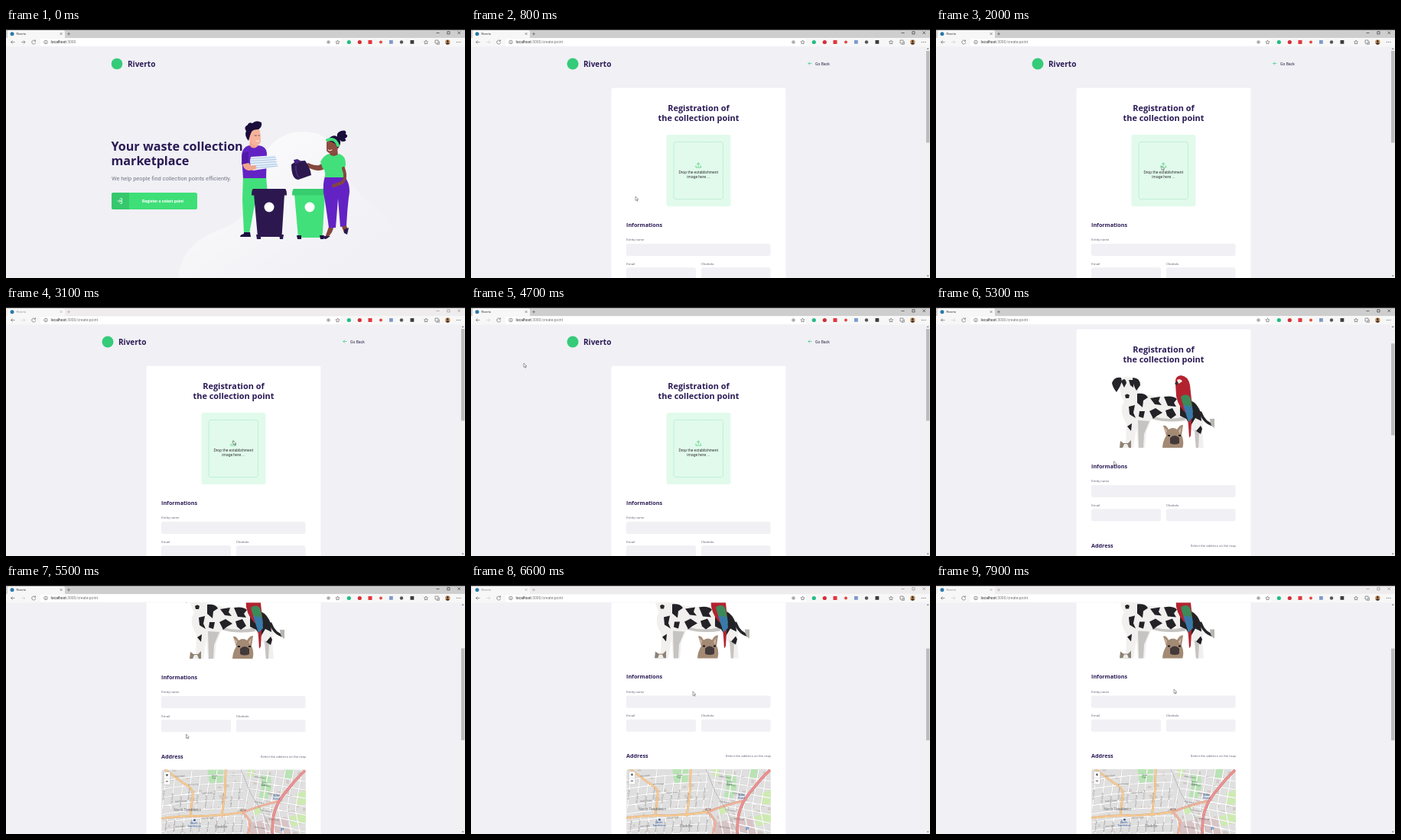
These frames come from a looping animation (600x328 px, 8000 ms). An HTML page:

```html
<!DOCTYPE html>
<html lang="en">
<head>
<meta charset="utf-8">
<title>Riverto</title>
<style>
  html, body { margin: 0; width: 100%; height: 100%; overflow: hidden; background: #f0f0f5; }
  svg { display: block; width: 600px; height: 328px; }
  text { font-family: Roboto, sans-serif; }
  .h { font-family: "Open Sans", sans-serif; font-weight: 700; fill: #2a1a55; }
  .label { font-size: 4.4px; fill: #6c6c80; }
  .mid { text-anchor: middle; }
  .line { fill: none; stroke-linecap: round; stroke-linejoin: round; }
  .ui { fill: none; stroke: #555; stroke-width: .6; }
  .ink { stroke: #222; }
  .dim { stroke: #ccc; }
  .street text { font-size: 2.7px; fill: #666; }
  .inactive #strip { fill: #efecee; }
  .inactive #caption { opacity: .5; }
</style>
</head>
<body>
<svg id="stage" viewBox="0 0 600 328">
  <defs>
    <linearGradient id="glow" x1="0" y1="0" x2="1" y2="1">
      <stop offset=".15" stop-color="#fff" stop-opacity=".75"/>
      <stop offset=".85" stop-color="#fff" stop-opacity="0"/>
    </linearGradient>
    <clipPath id="mapBox"><rect width="188.5" height="120" rx="3"/></clipPath>
    <clipPath id="photoBox"><rect x="228" y="136" width="136" height="96"/></clipPath>
  </defs>
  <rect width="600" height="328" fill="#f0f0f5"/>

  <g id="home">
    <path fill="url(#glow)" d="M226 328C226 295 250 275 285 262C330 245 323 200 333 175C343 149 365 136 388 136C415 136 432 150 438 175C445 215 492 235 511 270C522 290 524 310 522 328Z"/>
    <circle cx="145" cy="47" r="7.3" fill="#34cb79"/>
    <text class="h" x="159" y="50.6" font-size="10">Riverto</text>
    <text class="h" x="137.5" y="161" font-size="16.15">Your waste collection</text>
    <text class="h" x="137.5" y="180.2" font-size="16.15">marketplace</text>
    <text x="138" y="199.8" font-size="7.45" fill="#77778a">We help people find collection points efficiently.</text>
    <rect x="138" y="216" width="112" height="22" rx="2.5" fill="#3fdf78"/>
    <path d="M161 216H140.5Q138 216 138 218.5V235.5Q138 238 140.5 238H161Z" fill="#36c86d"/>
    <path class="line" stroke="#fff" stroke-width=".8" d="M146 227H150M148.6 225.4L150.2 227L148.6 228.6M149.5 223.8H151.5V230.2H149.5"/>
    <text x="178" y="228.9" font-size="5.35" font-weight="700" fill="#fff">Register a colect point</text>

    <!-- man -->
    <path fill="#42e07a" d="M310 194H340L343 232H325L318 270H311L309 225Z"/>
    <path fill="#1d1040" d="M311 268H319L320 274H306Q306 271 311 270Z"/>
    <path fill="#f2a58c" d="M319 146H329V159Q324 163 318 157Z"/>
    <path fill="#f7b39b" d="M317 134Q320 128 331 132Q333 139 333 149Q331 155 326 154Q319 152 317 143Z"/>
    <path fill="#1a0c3a" d="M317 148Q311 141 314 135Q310 130 316 127Q317 123 322 125Q327 120 334 124Q335 130 330 133Q323 133 321 136L319 141Z"/>
    <path class="line" stroke="#1a0c3a" stroke-width=".6" d="M325 141Q326 142 327.5 141M330 141L331.5 141"/>
    <path class="line" stroke="#fff" stroke-width=".9" d="M327 148Q329 150 331 148"/>
    <path fill="#6323c4" d="M318 154Q324 161 330 154Q340 155 341 164L340 197H310L308 170Q308 156 318 154Z"/>
    <path fill="#f2a58c" d="M309 177L315 175L320 180L328 181L327 186L317 187Q310 186 309 177Z"/>
    <path fill="#511aa8" d="M309 164L317 162V177L308 179Z"/>
    <path fill="#e8effa" d="M320 169L352 167L355 182L323 187Q317 178 320 169Z"/>
    <path class="line" stroke="#8fb6dc" stroke-width=".7" d="M320 171.5L352 169.5M320 174.5L353 172.5M320 177.5L353 175.5M321 181L354 178.5M322 184L355 181"/>
    <path fill="#f2a58c" d="M319 181L326 180L328 184L322 187Z"/>

    <!-- bins -->
    <path fill="#2c184f" d="M324 218H364L360.5 274H329ZM323 211H365Q367 212 367 219.5H321Q321 212 323 211ZM327 271H333V277H328ZM357 271H363L362 277H358Z"/>
    <path fill="#42e07a" d="M377 218H417L413.5 275H382Z"/>
    <path fill="#37cd6e" d="M376 211H418Q420 212 420 219.5H374Q374 212 376 211Z"/>
    <path fill="#1d1040" d="M380 272H386V277H381ZM410 272H416L415 277H411Z"/>
    <circle cx="344" cy="235" r="6.5" fill="#fff"/>
    <circle cx="397" cy="235" r="6.5" fill="#fff"/>

    <!-- woman -->
    <path fill="#84473d" d="M424 255L431 254L426 268L420 276L417 275ZM437 255L443 252L447 266L442 269Z"/>
    <path fill="#2c184f" d="M416 273L424 273L418 277L414 276ZM442 264L448 262L446 271L442 269Z"/>
    <path fill="#6323c4" d="M418 192H441Q452 206 448 222Q446 239 445 259L437 261L434 224L431 262H422Q418 232 415 216Q414 201 418 192Z"/>
    <path fill="#84473d" d="M414 177L416 185Q408 190 395 183L392 179L395 177Q404 181 409 180Z"/>
    <path fill="#84473d" d="M424 157L433 156L434 169Q428 174 423 167Z"/>
    <path fill="#42e07a" d="M422 165Q428 171 435 165Q444 167 444 179L441 196H417Q418 186 414 184L411 176Q414 168 422 165Z"/>
    <path class="line" stroke="#84473d" stroke-width="4" d="M441 184Q446 198 439 203L428 207"/>
    <path fill="#8d4c40" d="M419 150Q424 143 433 148Q436 158 431 164Q423 167 419 161Z"/>
    <path fill="#1a0c3a" d="M422 145Q430 137 436 146Q439 151 434 158Q431 150 422 148ZM434 145Q430 138 438 135Q446 133 444 139Q449 142 443 145Q447 149 439 149Z"/>
    <path class="line" stroke="#42e07a" stroke-width="4" d="M420 147Q430 143 434 154"/>
    <path class="line" stroke="#fff" stroke-width="1" d="M421 160Q423 162 426 160"/>
    <path fill="#2c184f" d="M373 179L379 175L391 174Q398 184 399 193L382 199Q373 198 373 179Z"/>
    <path fill="#46227e" d="M376 173L381 172L386 175L378 179Z"/>
    <path class="line" stroke="#6a4aa0" stroke-width=".8" d="M379 181Q378 191 383 196"/>
  </g>

  <g id="form">
    <g id="page">
      <circle cx="133" cy="47" r="7.5" fill="#34cb79"/>
      <text class="h" x="147" y="50.5" font-size="10">Riverto</text>
      <path class="line" stroke="#34cb79" stroke-width=".7" d="M445 46.5H441M442.7 44.8L441 46.5L442.7 48.2"/>
      <text x="450" y="48.5" font-size="5.1" fill="#2c2545">Go Back</text>
      <rect x="183.5" y="78.5" width="228" height="600" rx="2.5" fill="#fff"/>
      <text class="h mid" x="297.5" y="109.2" font-size="10.9">Registration of</text>
      <text class="h mid" x="297.5" y="122.4" font-size="10.9">the collection point</text>

      <g id="drop">
        <rect x="255.5" y="140" width="84" height="94" rx="3" fill="#e1faec"/>
        <rect x="265" y="149.5" width="64.5" height="75" rx="3" fill="none" stroke="#4ecb79" stroke-width=".35" stroke-dasharray="1.2 .7"/>
        <path class="line" stroke="#4ecb79" stroke-width=".8" d="M294 181V183H300.5V181M297.2 181V177.2M295.5 178.8L297.2 177L299 178.8"/>
        <text class="mid" x="297.3" y="190.5" font-size="5" fill="#333">Drop the establishment</text>
        <text class="mid" x="297.3" y="196.6" font-size="5" fill="#333">image here ...</text>
      </g>

      <g id="photo" transform="translate(0 2)" clip-path="url(#photoBox)">
        <!-- great dane -->
        <path fill="#f1f0ee" d="M240 143Q250 134 260 143L266 160Q290 167 318 164Q340 167 346 184Q352 196 348 208L350 233H339L338 212Q330 206 326 196Q302 200 282 194L275 211L273 233H264L262 206L258 233H248L249 200Q238 184 246 171Q240 164 240 143Z"/>
        <path fill="#c6c4c2" d="M264 196L279 197L272 214L271 233H265ZM338 208L344 212L343 233H340ZM284 191Q305 197 325 191L326 196Q302 200 282 194Z"/>
        <path fill="#25252a" d="M242 140Q233 138 230 147Q231 153 236 159Q241 152 243 145ZM257 140Q267 140 267 150L262 157Q257 149 257 140Z"/>
        <path fill="#25252a" d="M242 145Q247 138 249 147L246 153ZM252 143L258 143L258 153L254 150ZM247 163Q250 160 253 163L252 167H248Z"/>
        <path fill="#222227" d="M263 161Q274 160 277 166L271 170L270 179L263 173ZM280 167L293 165L291 171L295 176L286 175ZM298 165Q310 163 315 168L311 173L314 178L303 177ZM279 184L287 180L296 186L289 190L284 194ZM300 183L309 180L314 189L307 194L302 190ZM319 174L330 177L333 170Q342 174 346 186L347 197L339 193L333 203L327 194L319 190ZM252 178L260 176L258 186L261 193L253 188ZM266 184L273 184L271 193L265 191ZM340 210L346 203L348 207L346 214ZM250 204L256 200L255 210Z"/>
        <path class="line" stroke="#25252a" stroke-width="3.5" d="M346 186Q351 200 363 202"/>
        <!-- parrot -->
        <path fill="#b3232f" d="M313 147Q312 138 320 137Q330 138 332 150L335 178L333 216L331 219L329 188Q317 180 314 164Z"/>
        <path fill="#f0e9e1" d="M315 143Q320 140 322 145L317 148Z"/>
        <path fill="#333" d="M314 145L312 148L315 150L317 147Z"/>
        <path fill="#3c8a5a" d="M320 165Q329 159 333 168L336 186Q325 188 320 165Z"/>
        <path fill="#397aa9" d="M323 176L335 178L336 192L330 198Z"/>
        <!-- small animals -->
        <path fill="#a38a74" d="M297 203Q301 202 304 208Q310 204 315 208Q319 201 323 202L321 215Q325 224 322 233H296Q296 224 301 216Z"/>
        <path fill="#d6b4a3" d="M298 205L302 209L301 214ZM321 205L317 210L319 214Z"/>
        <path fill="#43393a" d="M306 219Q312 213 318 219L318 226Q312 229 306 226Z"/>
        <path fill="#171416" d="M303 215H306V217H303ZM317 215H320V217H317Z"/>
        <path fill="#8d8173" d="M240 232L241 223L245 226H251L255 222L255 232Z"/>
        <path fill="#eee" d="M246 227H250L252 232H244Z"/>
        <path fill="#b6b6b1" d="M358 194H364V206Q358 203 358 194Z"/>
      </g>

      <text class="h" x="203" y="260.7" font-size="7.2">Informations</text>
      <text class="label" x="203.3" y="279.4">Entity name</text>
      <text class="label" x="203.3" y="310.6">Email</text>
      <text class="label" x="301" y="310.6">Chattolo</text>
      <g fill="#f0f0f5">
        <rect x="203" y="283" width="188.5" height="16" rx="2.5"/>
        <rect x="203" y="314.3" width="91" height="16" rx="2.5"/>
        <rect x="301" y="314.3" width="90.5" height="16" rx="2.5"/>
      </g>
      <text class="h" x="203" y="364.8" font-size="7.2">Address</text>
      <text class="label" x="392" y="364" text-anchor="end">Select the address on the map</text>
      <g transform="translate(203.2 379.5)">
        <g id="map" class="street" clip-path="url(#mapBox)"></g>
        <rect x="3" y="3" width="8.5" height="17" rx="1" fill="#fff" stroke="#bbb" stroke-width=".6"/>
        <path stroke="#ccc" stroke-width=".5" d="M3.3 11.5H11.2"/>
        <path class="line" stroke="#222" stroke-width=".8" d="M6 7.2H8.4M7.2 6V8.4M6 15.5H8.4"/>
      </g>
    </g>
    <rect x="594" y="24" width="6" height="304" fill="#f1f1f1"/>
    <rect id="thumb" x="595" y="30" width="4.5" height="120.5" fill="#bcbcbc"/>
    <path fill="#777" d="M595.7 28H598.7L597.2 26.3ZM595.7 324.5H598.7L597.2 326.2Z"/>
  </g>

  <g id="browser">
    <rect id="strip" width="600" height="14" fill="#cecece"/>
    <rect width="600" height="2.5" fill="#000"/>
    <path fill="#f7f7f7" d="M2 13V5Q2 3 4 3H75Q77 3 77 5V13H600V24.5H0V13Z"/>
    <rect x="45" y="14" width="393" height="9.5" rx="1.5" fill="#fff"/>
    <circle cx="8" cy="7.7" r="2.5" fill="#2879a8"/>
    <g id="caption">
      <text x="13.5" y="9.2" font-size="4" fill="#333">Riverto</text>
      <path class="ui" d="M70.7 6.2L73.5 9M73.5 6.2L70.7 9M80 7.7H84M82 5.7V9.7"/>
      <path class="ui ink" d="M562.5 6.5H566.5M576.8 4.7H580V8H576.8ZM590.5 4.5L594 8M594 4.5L590.5 8"/>
    </g>
    <path class="ui" d="M11.5 18.5H6.5M8.7 16.3L6.5 18.5L8.7 20.7"/>
    <path id="forward" class="ui" d="M20 18.5H25M22.8 16.3L25 18.5L22.8 20.7"/>
    <path class="ui" d="M38.2 17A2.5 2.5 0 1 0 38.7 19M38.5 15.5V17.3H36.7"/>
    <circle class="ui" cx="52" cy="18.5" r="2.3"/>
    <path class="ui" d="M52 18V20M52 16.8V17.3"/>
    <text x="58.5" y="20.2" font-size="5" fill="#222">localhost<tspan id="path" fill="#777"></tspan></text>
    <circle class="ui" cx="421.5" cy="18.5" r="1.8"/>
    <circle cx="421.5" cy="18.5" r=".8" fill="#555"/>
    <path id="star" class="ui" d="M433.5 16L434.3 17.7L436.1 18L434.8 19.2L435.1 21L433.5 20.1L431.9 21L432.2 19.2L430.9 18L432.7 17.7Z"/>
    <use href="#star" x="115.5"/>
    <circle cx="448.3" cy="18.5" r="2.6" fill="#24bd83"/>
    <circle cx="462.3" cy="18.5" r="2.6" fill="#d52e39"/>
    <rect x="473.5" y="16" width="5" height="5" fill="#e2363d"/>
    <circle cx="490" cy="18.5" r="2" fill="#df4a3f"/>
    <rect x="501" y="16" width="4.8" height="4.8" fill="#7d9acb"/>
    <circle cx="517" cy="18.5" r="2.2" fill="#555"/>
    <rect x="528.5" y="16" width="4.8" height="4.8" fill="#3c3c3c"/>
    <path class="ui" d="M561 16H565V20H561ZM562.5 21.3H566.3V17.5"/>
    <circle cx="577.3" cy="18.5" r="3.2" fill="#c8935d"/>
    <path fill="#3d2d29" d="M574.8 20.5Q577.3 18 579.8 20.5Q577.3 23 574.8 20.5ZM576 17.4A1.3 1.3 0 1 1 578.6 17.4A1.3 1.3 0 1 1 576 17.4"/>
    <g fill="#555"><circle cx="589.5" cy="18.5" r=".6"/><circle cx="591.7" cy="18.5" r=".6"/><circle cx="593.9" cy="18.5" r=".6"/></g>
  </g>
  <path id="cursor" fill="#fff" stroke="#333" stroke-width=".45" d="M0 0V5.4L1.3 4.3L2.1 6.2L3 5.8L2.2 4H3.8Z"/>
</svg>

<script>
const $ = id => document.getElementById(id);
const LOOP = 8000, PAGE_OPEN = 500, IMAGE_SET = 4800;

// rows of [time, value, ...], linear between rows
const CURSOR = [
  [0, 232, 334], [400, 217, 228], [500, 215, 221], [1100, 215, 221], [1400, 205, 231],
  [1700, 246, 213], [2000, 295, 181], [2300, 297, 176.5], [3100, 297, 176.5],
  [3600, 116, 116], [4200, 69, 75], [4700, 69, 75], [5100, 222, 202], [5200, 231, 207],
  [5500, 235.5, 197], [5900, 290, 141], [7500, 290, 141], [7700, 393, 132], [7900, 311, 138]
];
const SCROLL = [[5100, 0], [5200, 2], [5300, 48], [5400, 106], [5500, 136], [5600, 136.6]];

function at(keys, t) {
  const i = keys.findIndex(k => k[0] > t);
  if (i < 0) return keys.at(-1).slice(1);
  if (!i) return keys[0].slice(1);
  const a = keys[i - 1], b = keys[i], p = (t - a[0]) / (b[0] - a[0]);
  return a.slice(1).map((v, n) => v + (b[n + 1] - v) * p);
}

function buildMap() {
  let seed = 7;
  const rand = () => (seed = seed * 16807 % 2147483647) / 2147483647;
  const road = (d, color, width, edge) =>
    `<path class="line" d="${d}" stroke="${edge}" stroke-width="${width + .7}"/>` +
    `<path class="line" d="${d}" stroke="${color}" stroke-width="${width}"/>`;
  const word = (x, y, angle, s, style = '') =>
    `<text transform="translate(${x} ${y}) rotate(${angle})" style="${style}">${s}</text>`;
  const blue = 'font-size:3.7px;fill:#2757a5', green = 'fill:#398344';
  const names = ['Orrin Road', 'Pell Avenue', 'Tasker Road', 'Mabry Street', 'Quill Road', 'Fennick Road'];
  let out = '<rect width="189" height="120" fill="#e0dfdf"/>', streets = '', labels = '';

  for (let i = 0; i < 90; i++)
    out += `<rect x="${rand() * 186}" y="${rand() * 118}" width="${2 + rand() * 5}" height="${2 + rand() * 3}" fill="#d2cbc5"/>`;
  out += '<path fill="#b8e3b4" d="M60 0H81L80 17L63 20ZM130 5L143 7L144 24L138 40L127 37L131 22ZM160 0H173L172 11L161 13Z"/>' +
    '<path fill="#cdebb0" d="M175 32L189 27V45L177 47ZM112 0H122L121 9L113 10ZM120 51L133 45L130 58L121 60ZM166 62L189 56V70L171 75Z"/>' +
    '<path fill="#d8c3c5" d="M113 70L139 66L141 88H112ZM147 66L163 62L170 85H147Z"/>';

  for (let i = 0; i < 10; i++) {
    const x = 3 + i * 11;
    streets += `M${x + 4} ${i % 3 * 8}L${x - 2} 52M${x + 5} 60L${x - 1} 120`;
    labels += word(x, 40 + i % 3 * 5, -84, names[i % 6]) + word(x + 3, 82, -84, names[(i + 2) % 6]);
  }
  for (let i = 0; i < 8; i++) {
    const y = 10 + i * 11;
    streets += `M0 ${y + 5}Q45 ${y - 3} 107 ${y - 4}M${108 + i * 4} ${y - 7}L189 ${y + 6}`;
    labels += word(18 + i % 3 * 17, y, -4, names[i % 6]) + word(121 + i % 3 * 9, y, 9, names[(i + 3) % 6]);
  }
  for (let x = 118; x < 195; x += 11) streets += `M${x} 0L${x - 9} 52L${x + 4} 120`;
  out += road(streets, '#fff', 1.2, '#cccaca');

  const trunk = 'M189 0Q176 12 167 24Q157 35 151 47Q144 62 145 85L147 120';
  out += road('M5 0L29 18Q41 24 41 32L38 60M84 0L83 28L79 61M0 64Q34 60 56 61L84 59L107 56', '#f7cb96', 2, '#d6a568') +
    road('M107 56Q126 48 151 42M107 56L116 68L113 88', '#f3b69f', 2.1, '#cd8975') +
    road(trunk, '#ec9292', 2.8, '#cc6669') +
    '<path class="line" d="M104 0L116 30L133 58L148 90" stroke="#999" stroke-width=".6" stroke-dasharray="2 1"/>';
  out += labels +
    word(16, 54, 0, 'North Tambleton', 'font-size:4.8px;fill:#777') +
    word(38, 71, 0, 'North', blue) + word(34, 75, 0, 'Tambleton', blue) +
    word(146, 35, 0, 'Aldle', blue) + word(146, 39, 0, 'Road', blue) +
    word(70, 76, 0, 'Haddle', 'font-size:5px;fill:#777') +
    word(131, 18, 0, 'Nettle', green) + word(131, 21, 0, 'Green', green) +
    word(66, 9, 0, 'Sorrel', green) + word(66, 12, 0, 'Park', green) +
    word(103, 54, 0, 'A238', 'font-size:3.2px;fill:#713526') +
    word(156, 80, 0, 'P', 'font-size:6px;fill:#277bc2;font-weight:700') +
    '<rect x="42" y="65" width="2.5" height="2.5" fill="#2757a5"/>';
  $('map').innerHTML = out;
}

function draw(now) {
  const t = Math.floor(now % LOOP / 100) * 100;
  const open = t >= PAGE_OPEN, hasImage = t >= IMAGE_SET;
  const [scroll] = at(SCROLL, t);
  const show = (id, on) => $(id).style.display = on ? '' : 'none';
  show('home', !open);
  show('form', open);
  show('drop', !hasImage);
  show('photo', hasImage);
  $('path').textContent = open ? ':3000/create-point' : ':3000';
  $('forward').classList.toggle('dim', open);
  $('page').setAttribute('transform', `translate(0 ${-scroll})`);
  $('thumb').setAttribute('y', 30 + scroll * .4);
  $('cursor').setAttribute('transform', `translate(${at(CURSOR, t)})`);
  $('browser').classList.toggle('inactive', t >= 2600 && t < 4700 || t >= 6600);
  requestAnimationFrame(draw);
}

buildMap();
requestAnimationFrame(draw);
</script>
</body>
</html>
```
